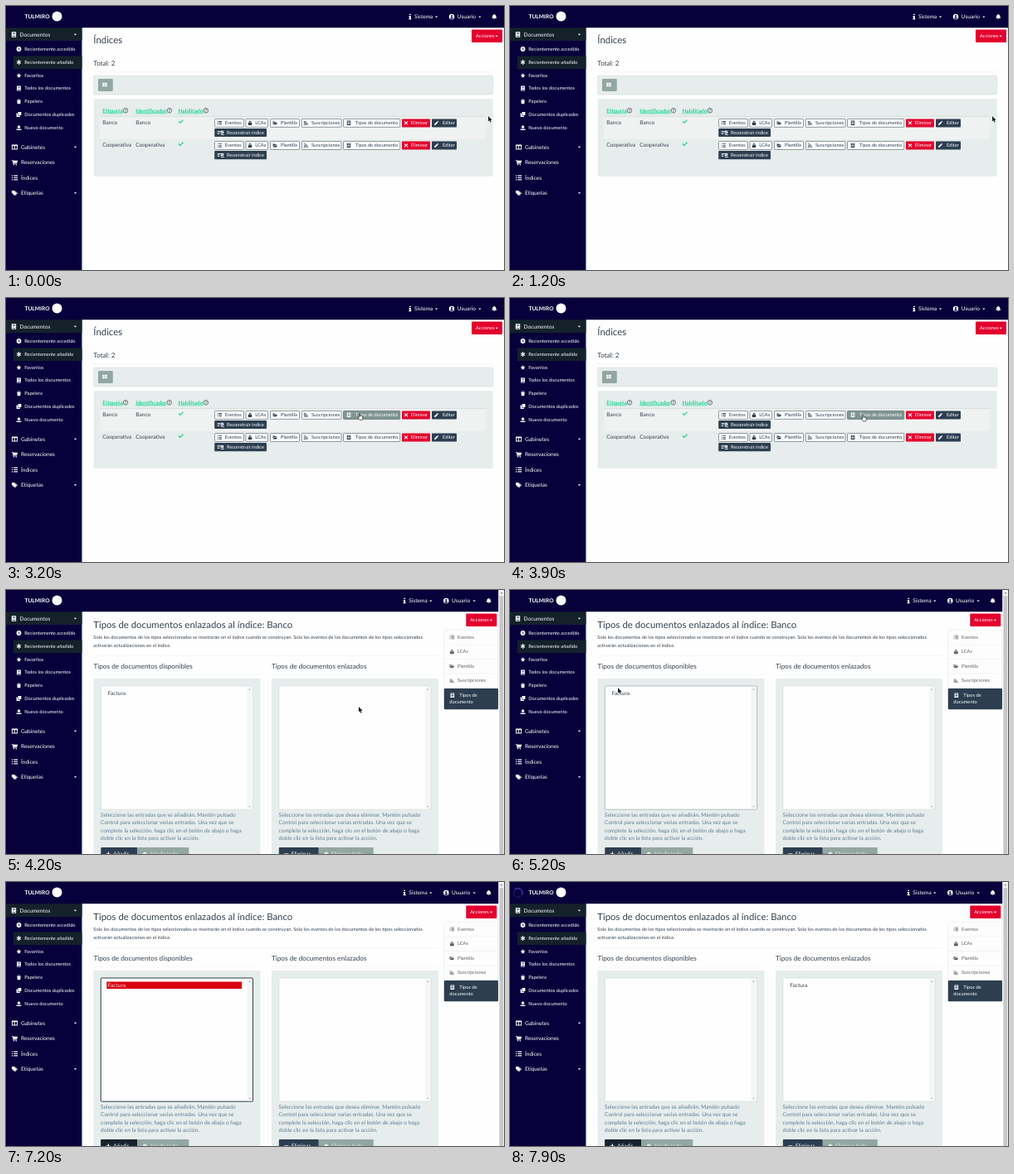
An HTML page with a canvas that plays this animation: 600x319 px, repeating every 8 s.

```html
<!DOCTYPE html>
<html lang="es">
<head>
<meta charset="utf-8">
<title>Índices</title>
<style>
html, body { margin: 0; width: 100%; height: 100%; overflow: hidden; background: #fefefe; }
canvas { display: block; }
</style>
</head>
<body>
<canvas id="stage" width="600" height="319"></canvas>
<script>
const ctx = document.getElementById('stage').getContext('2d');
ctx.textRendering = 'geometricPrecision';
const LOOP = 8000, STEP = 100;
const PAGE_AT = 4200, SELECT_AT = 5700, HOVER_AT = 6700, SPIN_AT = 7600, MOVED_AT = 7800;
const INK = '#36424e', DARK = '#2c3e50', NIGHT = '#18232d', RED = '#e3002d', GREEN = '#20d592';
const NAVY = '#08003a', ACTIVE = '#14212b';
const WELL = '#e6edec', MUTED = '#93a7a2', LINE = '#d3dbda', FAINT = '#eceeee', HELP = '#5f7d92', WHITE = '#fff';
const BODY = 6.56, SMALL = 5.72, SUB = 8.2, TITLE = 11.4;

// Icon outlines in a 12 unit box, filled even-odd.
const DISC = 'M0 6a6 6 0 1 0 12 0a6 6 0 1 0-12 0z';
const ICONS = {
  list: 'M0 1h2v2h-2zM4 1h8v2h-8zM0 5h2v2h-2zM4 5h8v2h-8zM0 9h2v2h-2zM4 9h8v2h-8z',
  lock: 'M1 5.5h10v6.5h-10zM3 5.5v-2a3 3 0 0 1 6 0v2h-1.8v-2a1.2 1.2 0 0 0-2.4 0v2z',
  folder: 'M0 2h4l1.5 1.5h4.5v1.5h-7l-3 5zM3.3 6h8.7l-2.5 4.5h-9z',
  rss: 'M0 10.5a1.5 1.5 0 1 0 3 0a1.5 1.5 0 1 0-3 0zM0 1a11 11 0 0 1 11 11h-2a9 9 0 0 0-9-9zM0 5a7 7 0 0 1 7 7h-2a5 5 0 0 0-5-5z',
  form: 'M1 0h10v12h-10zM3 2v1.5h6v-1.5zM3 5v4h2.5v-4zM6.5 5v4h2.5v-4z',
  clock: DISC + 'M5 2.5h1.6v3l2.4 2-1 1.2-3-2.4z',
  asterisk: 'M5 0h2v4l3.5-2 1 1.7-3.5 2.3 3.5 2.3-1 1.7-3.5-2v4h-2v-4l-3.5 2-1-1.7 3.5-2.3-3.5-2.3 1-1.7 3.5 2z',
  star: 'M6 0l1.8 4 4.2.4-3.2 2.8 1 4.3-3.8-2.3-3.8 2.3 1-4.3-3.2-2.8 4.2-.4z',
  book: 'M1 0h10v9h-1v1.5h1v1.5h-10zM3.5 2.5v1h5.5v-1zM3.5 4.5v1h5.5v-1zM3 9v1.5h5.5v-1.5z',
  trash: 'M1 1h3l.7-1h2.6l.7 1h3v1.5h-10zM1.7 3.5h8.6l-.6 8.5h-7.4z',
  copy: 'M4 0h8v8h-8zM0 3h3v6h6v3h-9z',
  upload: 'M6 0l5 5h-3v4h-4v-4h-3zM0 9h3v1h6v-1h3v3h-12z',
  columns: 'M0 1h12v10h-12zM1.5 4v5.5h3.8v-5.5zM6.7 4v5.5h3.8v-5.5z',
  cart: 'M0 1h2.5l.4 1.5h9.1l-1.2 5h-6.8l.2 1h6.3v1.3h-7.5l-1.6-7.5h-1.4zM3 11a1 1 0 1 0 2 0a1 1 0 1 0-2 0zM8 11a1 1 0 1 0 2 0a1 1 0 1 0-2 0z',
  tags: 'M0 1h5l5 5-4.5 5-5.5-5.5zM6.3 1l5.7 5-4.6 5-.8-.8 4.2-4.2-5-5z',
  info: 'M4 0h3.5v2.5h-3.5zM3 4h4.5v6h1.2v2h-6v-2h1.3v-4h-1z',
  user: DISC + 'M4 4.3a2 2 0 1 0 4 0a2 2 0 1 0-4 0zM2.5 9a4 4 0 0 1 7 0a5 5 0 0 1-7 0z',
  bell: 'M5.3 0h1.4v1c3 .5 3.3 3 3.3 5l1.5 3h-11l1.5-3c0-2 .3-4.5 3.3-5zM4.5 10h3a1.5 1.5 0 0 1-3 0z',
  times: 'M2 1l4 3.5 4-3.5 1.5 1.5-3.7 3.5 3.7 3.5-1.5 1.5-4-3.5-4 3.5-1.5-1.5 3.7-3.5-3.7-3.5z',
  pencil: 'M0 12l.7-3.5 6-6 2.8 2.8-6 6zM7.5 1.7l1.5-1.5 2.8 2.8-1.5 1.5z',
  check: 'M0 6.5l1.6-1.6 2.7 2.6 6-6 1.7 1.6-7.7 7.7z',
  grid: 'M0 1h5.5v4.5h-5.5zM6.5 1h5.5v4.5h-5.5zM0 6.5h5.5v4.5h-5.5zM6.5 6.5h5.5v4.5h-5.5z',
  caret: 'M1 4h10l-5 5z',
  up: 'M1 9h10l-5-6z',
  plus: 'M4.5 0h3v4.5h4.5v3h-4.5v4.5h-3v-4.5h-4.5v-3h4.5z',
  minus: 'M0 4.5h12v3h-12z',
  disc: DISC,
  rebuild: 'M-3 2h8v1.5h-8zM-3 5h6v1.5h-6zM-3 8h6v1.5h-6zM5 5a4 4 0 1 0 8 0a4 4 0 1 0-8 0zM7.5 5a1.5 1.5 0 1 0 3 0a1.5 1.5 0 1 0-3 0zM6 10h8v1.5h-8z'
};
for (const name in ICONS) ICONS[name] = new Path2D(ICONS[name]);
const ARROW = new Path2D('M0 0V7.2L1.6 5.7 2.8 8.4 4 7.9 2.8 5.3H5.1z');
const HAND = new Path2D('M1 .5Q2 0 2.2 1V3.2Q4 3 5.8 4.2V6.5L5 8.6H1.8L-.8 5.2Q-.3 4.3 1 5.2z');

function rect(x, y, w, h, fill, stroke, lineWidth = 0.6, radius = 0) {
  ctx.beginPath();
  ctx.roundRect(x, y, w, h, radius);
  if (fill) { ctx.fillStyle = fill; ctx.fill(); }
  if (stroke) { ctx.strokeStyle = stroke; ctx.lineWidth = lineWidth; ctx.stroke(); }
}

// y is the vertical middle of the capitals.
function text(str, x, y, size = BODY, color = INK, weight = 400) {
  ctx.font = `${weight} ${size}px Lato, sans-serif`;
  ctx.fillStyle = color;
  ctx.fillText(str, x, y + size * 0.34);
  return ctx.measureText(str).width;
}

function icon(name, x, y, color = WHITE, size = 6) {
  ctx.save();
  ctx.translate(x - size / 2, y - size / 2);
  ctx.scale(size / 12, size / 12);
  ctx.fillStyle = color;
  ctx.fill(ICONS[name], 'evenodd');
  ctx.restore();
}

const mix = (a, b, k) => a + (b - a) * k;
const inside = (p, x, y, w, h) => p.x >= x && p.x <= x + w && p.y >= y && p.y <= y + h;

const PATH = [
  [1600, 581, 133], [2100, 512, 122], [2600, 470, 129], [3200, 425.5, 139.5], [3400, 425, 141],
  [4200, 425, 141], [4700, 270, 134], [5200, 130, 118], [5600, 130, 119], [6500, 137, 332]
];
function pointer(t) {
  const i = PATH.findIndex(key => key[0] > t);
  if (i === 0) return { x: PATH[0][1], y: PATH[0][2] };
  const a = PATH[(i < 0 ? PATH.length : i) - 1], b = i < 0 ? a : PATH[i];
  const k = a === b ? 0 : (t - a[0]) / (b[0] - a[0]);
  return { x: mix(a[1], b[1], k), y: mix(a[2], b[2], k) };
}

function drawPointer(p, hand) {
  ctx.save();
  ctx.translate(p.x - (hand ? 1 : 0), p.y);
  ctx.scale(0.92, 0.92);
  ctx.lineWidth = hand ? 0.7 : 1;
  ctx.strokeStyle = hand ? '#111' : WHITE;
  ctx.fillStyle = hand ? WHITE : '#1c1c1c';
  const shape = hand ? HAND : ARROW;
  if (hand) { ctx.fill(shape); ctx.stroke(shape); }
  else { ctx.stroke(shape); ctx.fill(shape); }
  ctx.restore();
}

const SUBMENU = [
  ['clock', 'Recientemente accedido', 52], ['asterisk', 'Recientemente añadido', 68],
  ['star', 'Favoritos', 84], ['book', 'Todos los documentos', 99.5], ['trash', 'Papelera', 115.3],
  ['copy', 'Documentos duplicados', 131], ['upload', 'Nuevo documento', 147]
];
const MENU = [
  ['columns', 'Gabinetes', 170.5, true], ['cart', 'Reservaciones', 188.9],
  ['list', 'Índices', 207.5], ['tags', 'Etiquetas', 226, true]
];

function drawFrame(shift, t) {
  rect(0, 0, 91.5, 319, NAVY);
  rect(91.5, 26.3, 0.6, 293, '#7fa9b2');
  rect(0, 0, 600 - shift, 26.3, NAVY);

  text('TULMIRO', 22.5, 13, 6.6, WHITE, 700);
  icon('disc', 61.5, 12.5, WHITE, 12);

  rect(0, 26.3, 91.5, 15.7, ACTIVE);
  rect(9, 60.5, 82.5, 15.5, ACTIVE);
  icon('book', 9.5, 34.4, WHITE, 6.5);
  text('Documentos', 16.5, 34.4, BODY, WHITE);
  icon('caret', 83.5, 34.4, WHITE, 4);
  for (const [name, label, y] of SUBMENU) {
    icon(name, 15.5, y, WHITE, 5.8);
    text(label, 22.2, y, SMALL, WHITE);
  }
  for (const [name, label, y, more] of MENU) {
    icon(name, 10.5, y, WHITE, 7.2);
    text(label, 18, y, BODY, WHITE);
    if (more) icon('caret', 83.5, y, WHITE, 4);
  }

  ctx.save();
  ctx.translate(-shift, 0);
  icon('info', 487, 13, WHITE, 6.5);
  text('Sistema', 492, 13, BODY, WHITE);
  icon('caret', 518.5, 13.2, WHITE, 4);
  icon('user', 537, 13, WHITE, 6.5);
  text('Usuario', 543.8, 13, BODY, WHITE);
  icon('caret', 570.8, 13.2, WHITE, 4);
  icon('bell', 588.3, 13, WHITE, 6.5);
  rect(561, 28.5, 37, 15.5, RED, null, 0, 1);
  text('Acciones', 566, 36.2, SMALL, WHITE);
  icon('caret', 591.2, 36.4, WHITE, 4);
  ctx.restore();

  if (t >= SPIN_AT) {
    const turn = (t - SPIN_AT) / 500 * Math.PI * 2;
    ctx.lineWidth = 0.9;
    [['#25208a', 0, 6.3], ['#5350d8', turn, turn + 3]].forEach(([color, from, to]) => {
      ctx.strokeStyle = color;
      ctx.beginPath();
      ctx.arc(9.7, 13, 5.3, from, to);
      ctx.stroke();
    });
  }
}

// icon, label, left, width, icon x, text x, colour when filled
const ACTIONS = [
  ['list', 'Eventos', 251.5, 35, 257.2, 263.8], ['lock', 'LCAs', 289, 26.5, 294, 300.2],
  ['folder', 'Plantilla', 318.5, 35, 324.3, 331], ['rss', 'Suscripciones', 356.3, 47.7, 361.5, 368],
  ['form', 'Tipos de documento', 406.5, 68.2, 413, 420.8],
  ['times', 'Eliminar', 477, 34, 482, 487.8, RED], ['pencil', 'Editar', 513, 30, 518.7, 526, DARK]
];

function question(x, y) {
  ctx.beginPath();
  ctx.arc(x, y, 2.8, 0, 7);
  ctx.strokeStyle = INK;
  ctx.lineWidth = 0.7;
  ctx.stroke();
  text('?', x - 1.1, y, 4.6, INK, 700);
}

function drawIndexRow(name, y, p) {
  text(name, 116.3, y);
  text(name, 156.3, y);
  icon('check', 210.7, y - 0.7, GREEN, 6.5);
  let hit = false;
  for (const [glyph, label, x, w, ix, tx, fill] of ACTIONS) {
    const hover = inside(p, x, y - 4, w, 10);
    hit = hit || hover;
    const ink = fill || hover ? WHITE : DARK;
    rect(x, y - 3.9, w, 10, hover && !fill ? '#7f9690' : fill || '#fcfdfd', fill ? null : '#4c5a67', 0.6, 0.8);
    icon(glyph, ix, y + 1, ink, 5.4);
    text(label, tx, y + 1.1, SMALL, ink);
  }
  rect(251.2, y + 7.6, 62.8, 10.2, DARK, null, 0, 0.8);
  icon('rebuild', 259, y + 12.7, WHITE, 5.8);
  text('Reconstruir índice', 266, y + 12.6, SMALL, WHITE);
  return hit;
}

function drawIndexPage(p) {
  text('Índices', 105.3, 41.5, TITLE);
  text('Total: 2', 105.3, 68.8, SUB);
  rect(105.5, 79, 481.5, 0.5, FAINT);
  rect(105.7, 84.2, 481, 22.8, WELL, LINE, 0.6, 1);
  rect(111, 88, 17.8, 15, MUTED, null, 0, 1);
  icon('grid', 119, 95, WHITE, 5.6);
  rect(105.7, 112.2, 481, 93.8, WELL, null, 0, 1);
  rect(113.5, 133.7, 465, 27.2, '#eff2f1');
  [['Etiqueta', 116.3], ['Identificador', 156.3], ['Habilitado', 207.4]].forEach(([label, x]) => {
    const w = text(label, x, 126.5, BODY, GREEN, 700);
    rect(x, 129.6, w, 0.6, GREEN);
    question(x + w + 3.2, 126.3);
  });
  rect(113.5, 133.3, 465, 0.6, LINE);
  const first = drawIndexRow('Banco', 140.3, p);
  const second = drawIndexRow('Cooperativa', 167.4, p);
  return first || second;
}

const LINKS = [['list', 'Eventos'], ['lock', 'LCAs'], ['folder', 'Plantilla'], ['rss', 'Suscripciones']];

function drawSideLinks() {
  rect(527.8, 48.3, 65.2, 95.7, '#fdfdfd', '#e3e7e7', 0.5, 1);
  LINKS.forEach(([glyph, label], i) => {
    const y = 57 + i * 17.5;
    icon(glyph, 537.3, y, '#5c6166', 5.6);
    text(label, 544, y, SMALL, '#5c6166');
    rect(527.8, y + 8.8, 65.2, 0.5, '#e3e7e7');
  });
  rect(527.8, 119, 65.2, 25.2, DARK, null, 0, 1);
  icon('form', 537.8, 127.2, WHITE, 5.6);
  text('Tipos de', 546.3, 127.2, SMALL, WHITE);
  text('documento', 534.3, 135.3, SMALL, WHITE);
}

function drawPicker(x, o) {
  text(o.title, x, 91.8, SUB);
  rect(x, 101.8, 201, 0.5, FAINT);
  rect(x, 107, 201, 213, WELL, null, 0, 1);
  const left = x + 8.8;
  rect(left, 116, 183.2, 149.2, '#fefefe', o.focus ? '#1d2732' : o.hover ? '#8b9599' : '#ced6d6', o.focus ? 0.9 : 0.6, 1);
  rect(left + 176.3, 117, 6, 147.2, '#f5f6f6');
  icon('up', left + 179.2, 120, '#9a9a9a', 3);
  icon('caret', left + 179.2, 261.5, '#9a9a9a', 3);
  if (o.focus) rect(left + 7, 120.6, 162.8, 8.3, '#d9000f');
  if (o.entry) text('Factura', left + 8.5, 124.3, BODY, o.focus ? '#ffd9d9' : INK);
  const lines = [
    `Seleccione las entradas que ${o.verb}. Mantén pulsado`,
    'Control para seleccionar varias entradas. Una vez que se',
    'complete la selección, haga clic en el botón de abajo o haga',
    'doble clic en la lista para activar la acción.'
  ];
  lines.forEach((line, i) => text(line, x + 8.6, 271.7 + i * 9.5, BODY, HELP));
  rect(left, 311, o.split, 12, DARK, null, 0, 1);
  if (o.press) {
    ctx.globalAlpha = o.press;
    rect(left, 311, o.split, 12, NIGHT, null, 0, 1);
    ctx.globalAlpha = 1;
  }
  rect(left + o.split, 311, o.end - o.split, 12, MUTED, null, 0, 1);
  const base = 319;
  icon(o.glyph, left + 9, base, WHITE, 5);
  text(o.action, left + 15, base, BODY, WHITE);
  icon('disc', left + o.split + 9, base, '#dfe6e4', 5);
  text(o.action + ' todo', left + o.split + 15, base, BODY, '#dfe6e4');
}

function drawTypesPage(t, p) {
  text('Tipos de documentos enlazados al índice: Banco', 105.3, 41.7, TITLE);
  text('Solo los documentos de los tipos seleccionados se mostrarán en el índice cuando se construyan. Solo los eventos de los documentos de los tipos seleccionados', 105.3, 57.4, SMALL);
  text('activarán actualizaciones en el índice.', 105.3, 66.6, SMALL);
  rect(105.5, 79, 415.5, 0.5, FAINT);
  const moved = t >= MOVED_AT;
  drawPicker(105.5, {
    title: 'Tipos de documentos disponibles', verb: 'se añadirán', entry: !moved,
    focus: t >= SELECT_AT && !moved, hover: inside(p, 114, 116, 184, 149),
    glyph: 'plus', action: 'Añadir', split: 44, end: 106,
    press: Math.min(1, Math.max(0, (t - HOVER_AT) / 200))
  });
  drawPicker(320, {
    title: 'Tipos de documentos enlazados', verb: 'desea eliminar', entry: moved,
    glyph: 'minus', action: 'Eliminar', split: 48, end: 114
  });
  drawSideLinks();
  rect(593.7, 0, 6.3, 319, '#f3f3f3');
  rect(594.6, 7, 4.5, 312, '#c6c6c6');
  icon('up', 597, 3.4, '#666', 3.4);
}

function draw(now) {
  const t = Math.floor((now % LOOP) / STEP) * STEP;
  const p = pointer(t);
  const types = t >= PAGE_AT;
  rect(0, 0, 600, 319, '#fefefe');
  drawFrame(types ? 6.7 : 0, t);
  let hand = false;
  if (types) drawTypesPage(t, p);
  else hand = drawIndexPage(p);
  drawPointer(p, hand);
}

const start = performance.now();
function tick() {
  draw(performance.now() - start);
  requestAnimationFrame(tick);
}
tick();
</script>
</body>
</html>
```
